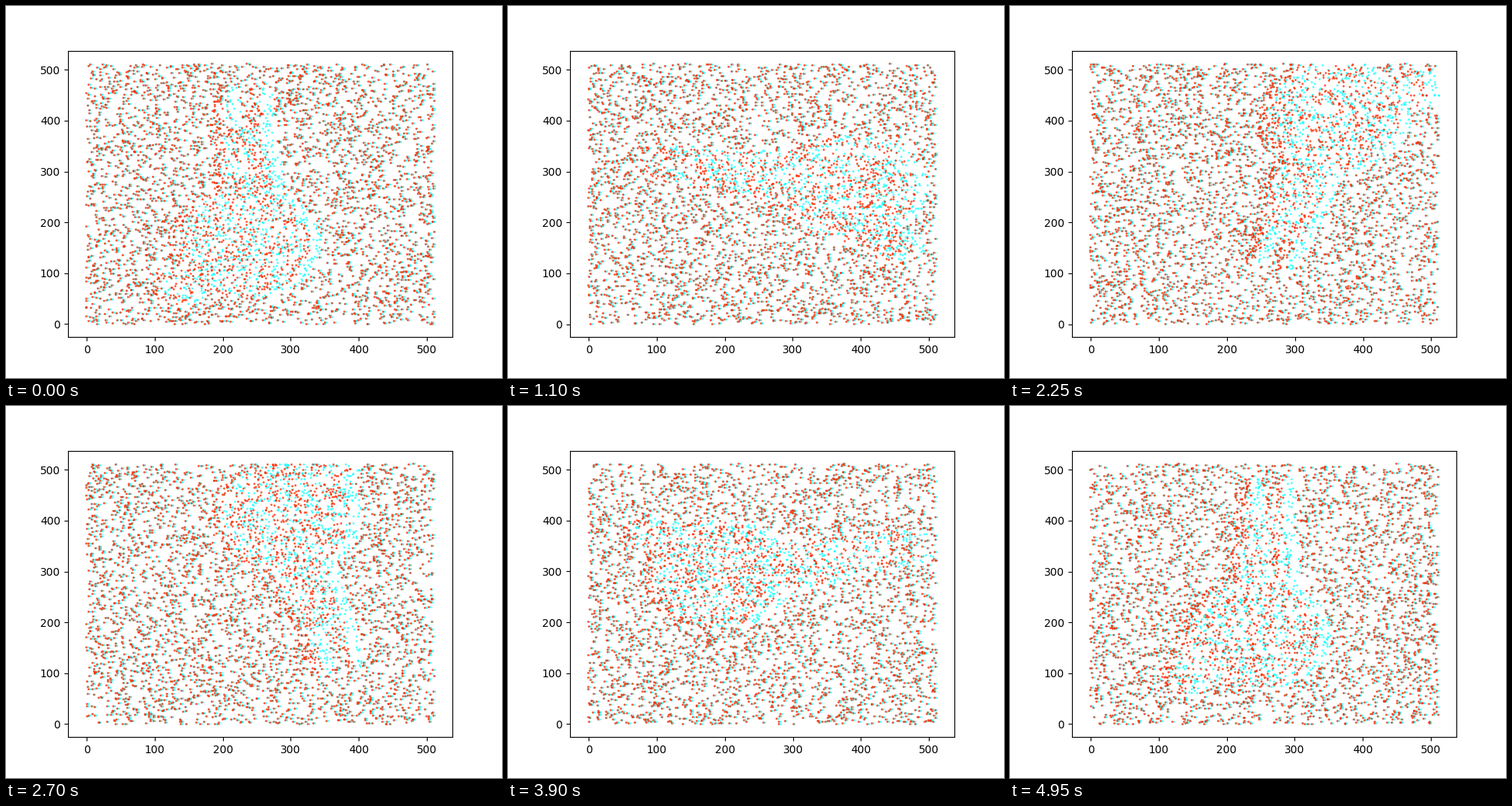
A matplotlib script for the animation above (5000 ms loop, 640 by 480 pixels).

```python
import numpy as np
import matplotlib.pyplot as plt
from matplotlib.animation import FuncAnimation

SIZE = 512
FRAMES = 100
DOTS = 8 * SIZE
NEAR, FAR = 18, 2  # horizontal offset between the two eyes


def in_ellipse(x, y, cx, cy, rx, ry):
    return ((x - cx) / rx) ** 2 + ((y - cy) / ry) ** 2 < 1


def in_figure(x, y):
    """Raised silhouette: body, neck, side lobe and two prongs."""
    body = in_ellipse(x, y, 241, 160, 105, 108)
    neck = in_ellipse(x, y, 245, 285, 46, 105)
    lobe = in_ellipse(x, y, 145, 76, 32, 40)
    prongs = in_ellipse(abs(x - 240), y, 24, 385, 14, 88)
    return body | neck | lobe | prongs


def is_near(x, y, angle):
    """Test dots against the figure turned inside its growing bounding box."""
    c, s = np.cos(angle), np.sin(angle)
    middle = SIZE / 2 * (abs(c) + abs(s))
    dx, dy = x - middle, y - middle
    return in_figure(dx * c + dy * s + SIZE / 2, dy * c - dx * s + SIZE / 2)


def limits(low, high):
    pad = 0.05 * (high - low)
    return low - pad, high + pad


fig, ax = plt.subplots(figsize=(6.4, 4.8), dpi=100)
style = dict(marker="o", linestyle="none", markersize=1.9, markeredgewidth=0)
right_eye, = ax.plot([], [], color="#00ffff", alpha=0.75, **style)
left_eye, = ax.plot([], [], color="#ff2a00", alpha=0.85, **style)


def draw(i):
    rng = np.random.default_rng(700 + i)
    x, y = rng.uniform(0, SIZE, (2, DOTS))
    near = is_near(x, y, 2 * np.pi * i / FRAMES)
    left = x - np.where(near, NEAR, FAR)
    right_eye.set_data(x, y)
    left_eye.set_data(left, y)
    ax.set_xlim(limits(left.min(), x.max()))
    ax.set_ylim(limits(y.min(), y.max()))
    return right_eye, left_eye


anim = FuncAnimation(fig, draw, frames=FRAMES, interval=50, repeat=True,
                     repeat_delay=0, blit=False)
plt.show()
```
